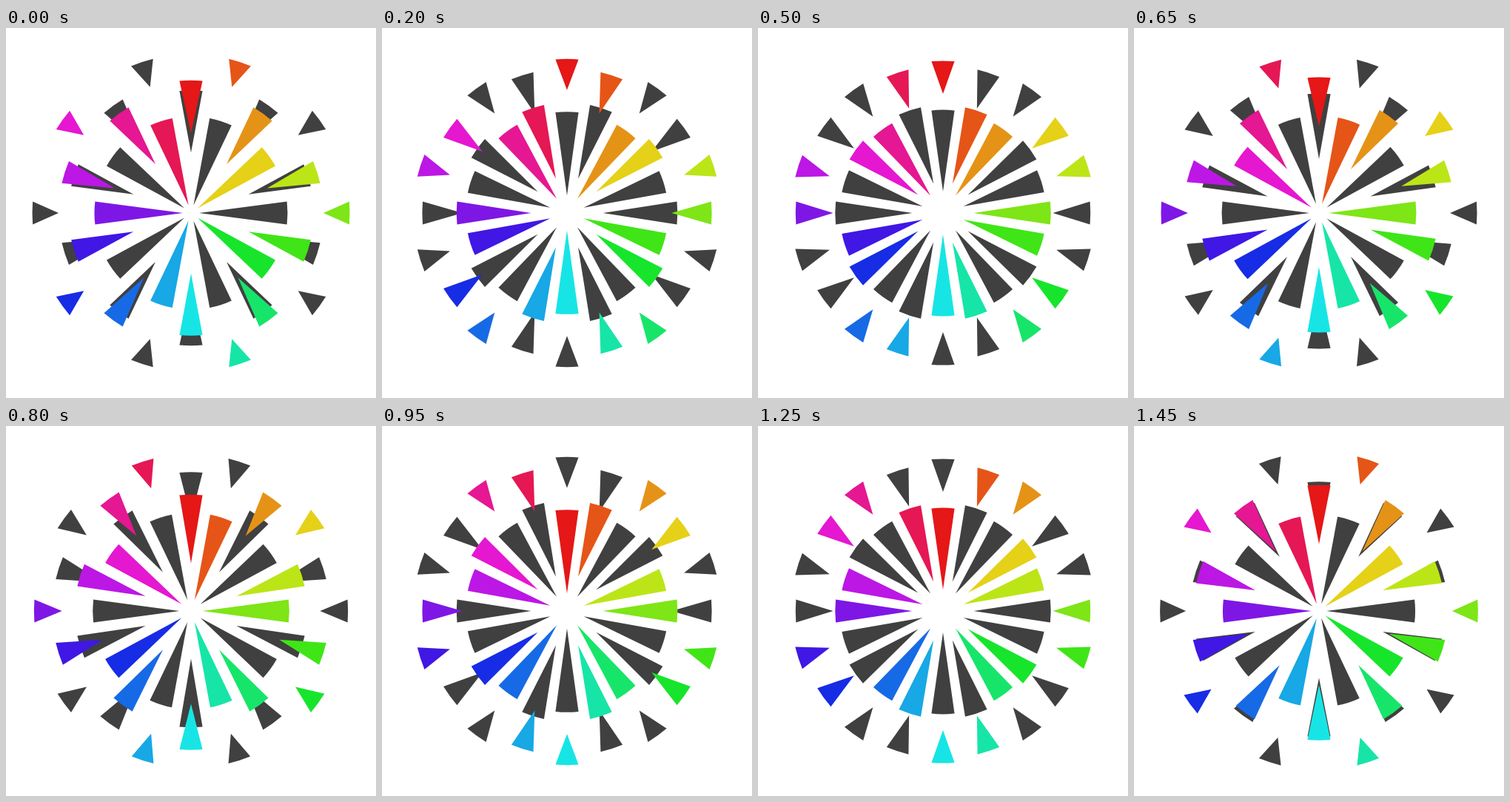
An HTML page with a canvas that plays this animation: 500x500 px, repeating every 1.5 s.

```html
<!DOCTYPE html>
<html lang="en">
<head>
<meta charset="utf-8">
<title>Wedge ring</title>
<style>
  html, body { margin: 0; width: 100%; height: 100%; overflow: hidden; background: #fff; }
  canvas { display: block; width: 500px; height: 500px; }
</style>
</head>
<body>
<canvas id="stage" width="500" height="500"></canvas>
<script>
const ctx = document.getElementById('stage').getContext('2d');
const LOOP = 1500, STEP = 50;
const SPOKES = 20, SIZE = 250;
const MID = 172.5, SWING = 42.5, HALF_WIDTH = 15.6;
const TAU = Math.PI * 2;

// Outer edge is an arc about the centre; the tip stretches inward as the radius shrinks.
function wedge(radius, angle, color) {
  const half = HALF_WIDTH / radius;
  ctx.save();
  ctx.rotate(angle);
  ctx.beginPath();
  ctx.moveTo(2 * radius - SIZE, 0);
  ctx.arc(0, 0, radius, -half, half);
  ctx.closePath();
  ctx.fillStyle = color;
  ctx.fill();
  ctx.restore();
}

function draw(time) {
  const phase = TAU * (time / LOOP + 1 / 40);
  ctx.fillStyle = '#fff';
  ctx.fillRect(0, 0, 500, 500);
  ctx.save();
  ctx.translate(SIZE, SIZE);
  for (let i = 0; i < SPOKES; i++) {
    const angle = i * TAU / SPOKES - TAU / 4;
    const shift = SWING * Math.sin(phase + i * TAU / 4);
    wedge(MID - shift, angle, '#404040');
    wedge(MID + shift, angle, `hsl(${i * 360 / SPOKES}, 81.8%, 49.5%)`);
  }
  ctx.restore();
}

const start = performance.now();
function tick() {
  const time = (performance.now() - start) % LOOP;
  draw(Math.floor(time / STEP) * STEP);
  requestAnimationFrame(tick);
}
tick();
</script>
</body>
</html>
```
